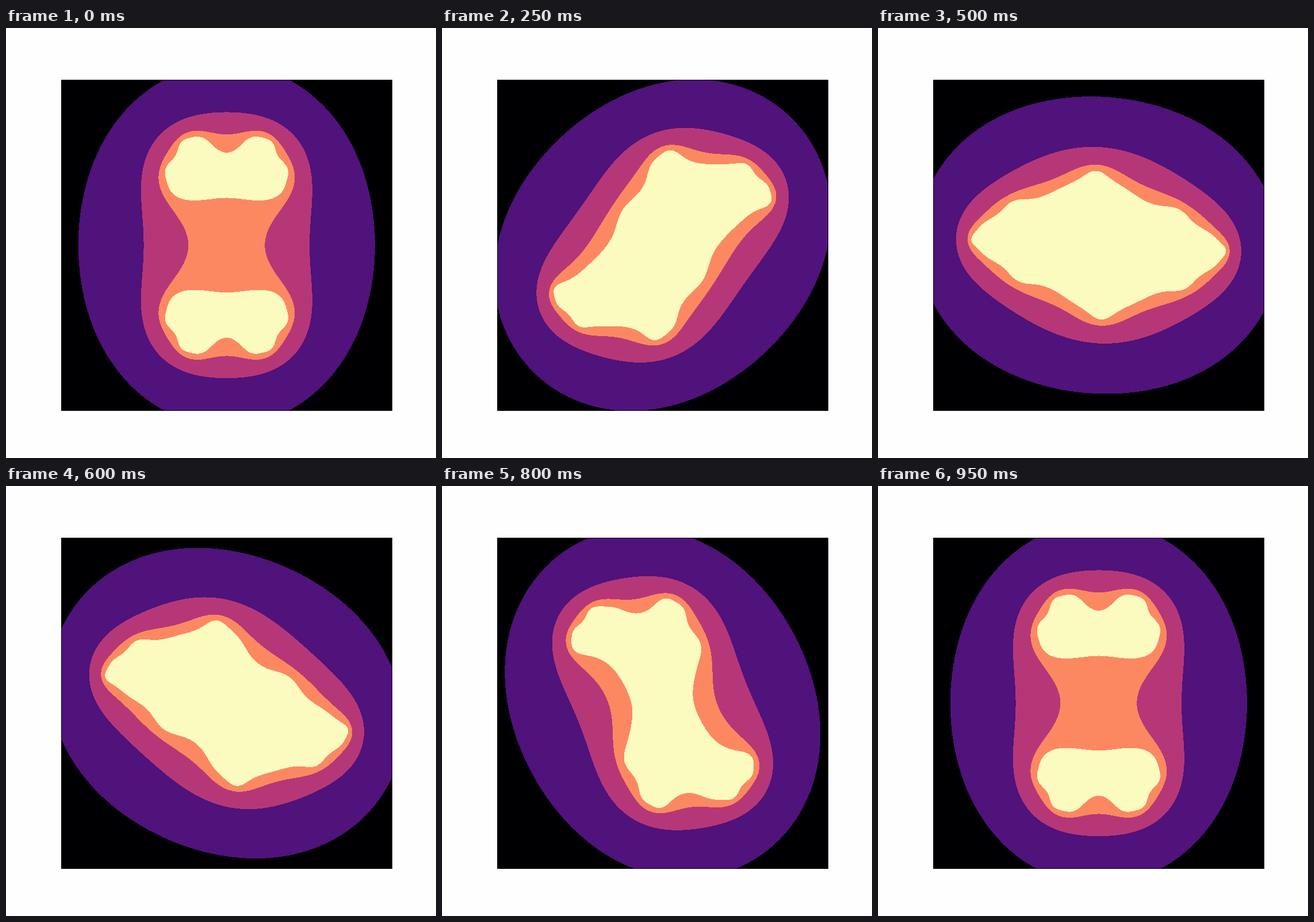
These frames come from a looping animation (748 px wide and 748 px high, 1000 ms). An HTML page with a canvas:

```html
<!DOCTYPE html>
<html lang="en">
<head>
<meta charset="utf-8">
<title>Escape bands of z² + c</title>
<style>
  html, body { margin: 0; width: 100%; height: 100%; overflow: hidden; background: #fefefe; }
  canvas { position: absolute; left: 96px; top: 90px; display: block; }
</style>
</head>
<body>
<canvas id="plot" width="576" height="576"></canvas>
<script>
const SIZE = 576;
const STEPS = 20;
const STEP_MS = 50;
const RADIUS = 0.7885;   // |c|
const LIMIT = 16;        // squared escape radius
const SCALE = 4 / SIZE;  // plane units per pixel
const MID = 287.8;
const BANDS = [[0, 0, 2], [80, 18, 123], [182, 55, 120], [252, 136, 97], [252, 251, 191]];

const ctx = document.getElementById("plot").getContext("2d");
const image = ctx.createImageData(SIZE, SIZE);

// Number of further iterations survived after the first, 0 to 4.
function band(x, y, cx, cy) {
  for (let n = 0; n < 4; n++) {
    const nx = x * x - y * y + cx;
    y = 2 * x * y + cy;
    x = nx;
    if (x * x + y * y > LIMIT) return n;
  }
  return 4;
}

function draw(step) {
  const angle = 2 * Math.PI * step / (STEPS - 1);
  const cx = RADIUS * Math.cos(angle);
  const cy = RADIUS * Math.sin(angle);
  const data = image.data;
  let p = 0;
  for (let j = 0; j < SIZE; j++) {
    const y = (j + 0.5 - MID) * SCALE;
    for (let i = 0; i < SIZE; i++) {
      const rgb = BANDS[band((i + 0.5 - MID) * SCALE, y, cx, cy)];
      data[p++] = rgb[0];
      data[p++] = rgb[1];
      data[p++] = rgb[2];
      data[p++] = 255;
    }
  }
  ctx.putImageData(image, 0, 0);
  ctx.strokeStyle = "rgba(0, 0, 0, 0.8)";
  ctx.strokeRect(0.5, 0.5, SIZE - 1, SIZE - 1);
}

const start = performance.now();
let shown = 0;
draw(shown);

function tick() {
  const elapsed = Math.max(0, performance.now() - start);
  const step = Math.floor(elapsed / STEP_MS) % STEPS;
  if (step !== shown) draw(shown = step);
  requestAnimationFrame(tick);
}
requestAnimationFrame(tick);
</script>
</body>
</html>
```
